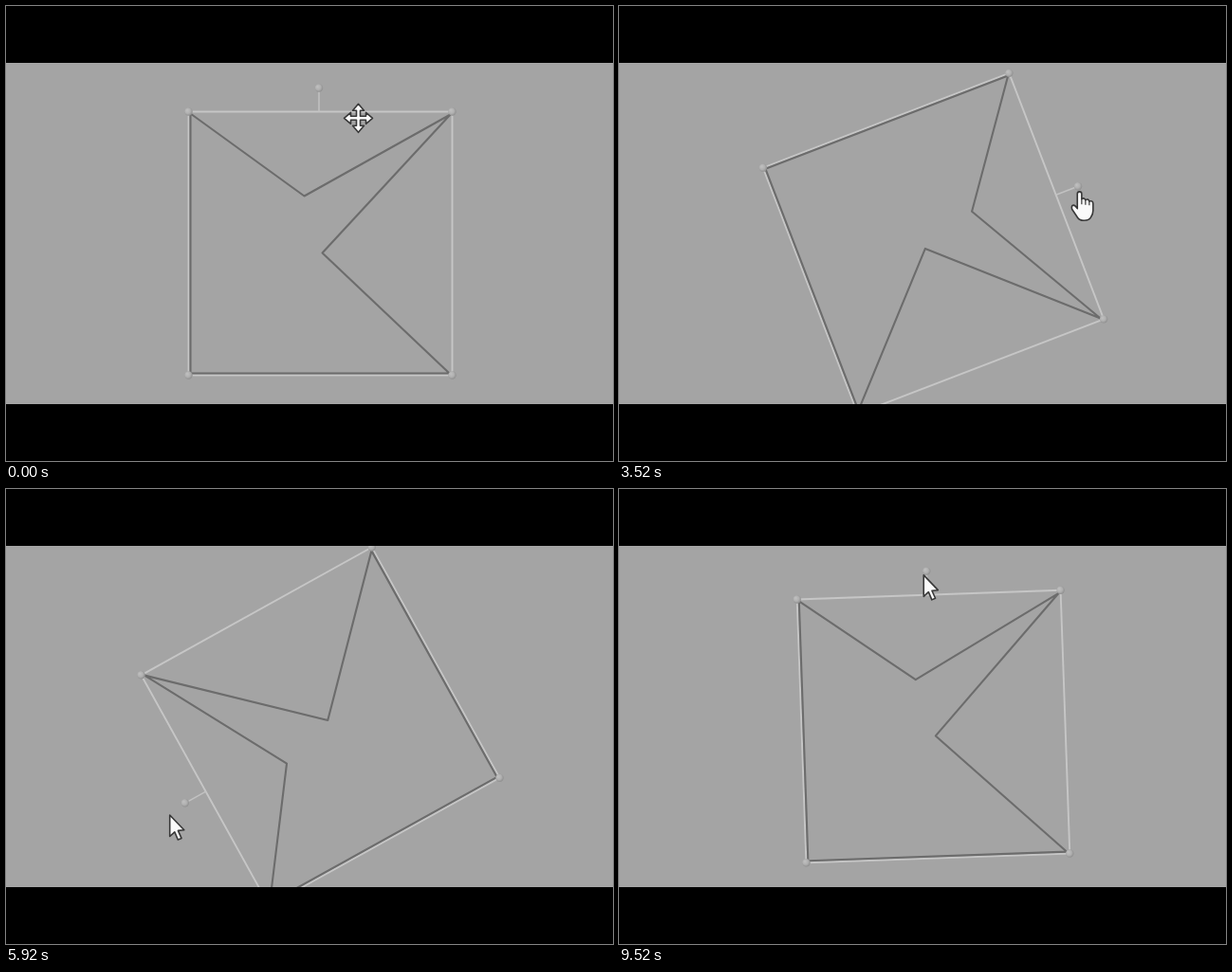
Write an HTML page with a canvas that moves like this. It is 640 by 480 pixels and loops after 9560 ms.

```html
<!DOCTYPE html>
<html lang="en">
<head>
<meta charset="utf-8">
<title>Rotating a shape by its handle</title>
<style>
html, body { margin: 0; width: 100%; height: 100%; overflow: hidden; background: #000; }
canvas { display: block; }
</style>
</head>
<body>
<canvas id="stage" width="640" height="480"></canvas>
<script>
const ctx = document.getElementById('stage').getContext('2d');
const LOOP = 9560, STEP = 40;
const CX = 331.5, CY = 250.5, HALF = 139, KNOB = 164;

// Each leg eases from the previous pose; launch is its starting speed.
const rest = { angle: 0, lead: 0.7, radius: 163 };
const drags = [
  { start: 1500, end: 3200, angle: 72, lead: 1.5, radius: 165, bulge: 15, launch: 0 },
  { start: 3480, end: 5600, angle: -119, lead: -1.4, radius: 184, bulge: -100, launch: 0.82 },
  { start: 7400, end: 8600, angle: -1, lead: -1.9, radius: 163, bulge: 150, launch: 1.25 },
  { start: 9040, end: 9120, angle: -2, lead: -1.9, radius: 161, bulge: 0, launch: 0 }
];

// Pointer travel between the drags
const home = { x: 371.5, y: 118.3 };
const glides = [
  { start: 40, end: 400, x: 324, y: 90 },
  { start: 600, end: 760, x: 333, y: 87 },
  { start: 5560, end: 5600, x: 172, y: 343 },
  { start: 6120, end: 6400, x: 202, y: 373 },
  { start: 6400, end: 6680, x: 192, y: 334 },
  { start: 6840, end: 7000, x: 187, y: 333 }
];

const outline = [[-137, -137], [-17, -50], [137, -136], [2, 10], [136, 137], [-137, 137]];
const corners = [[-HALF, -HALF], [HALF, -HALF], [HALF, HALF], [-HALF, HALF]];

const arrow = new Path2D('M.7 1V23.5L5.8 18.8L9.3 27L13 25.4L9.4 17.4L15.8 16.8Z');
const hand = new Path2D('M-2.3 2.5Q-2.3 .2 0 .2Q2.3 .2 2.3 2.5V8Q5 6 6.3 9Q9 7 10.3 10.3' +
  'Q14.3 9.3 14.3 13V20Q14.2 24 12 27Q10.5 30.5 4.5 30.5Q0 30.5-2 27.5' +
  'L-8 18.5Q-8.7 15-7 14.5Q-4.8 14-2.3 18Z');
const knuckles = new Path2D('M2.3 8V13.5M6.3 9V14M10.3 10.3V14.5');
const cross = new Path2D();
for (let i = 0; i < 4; i++) {
  const turn = new DOMMatrix().rotate(i * 90);
  for (const [x, y] of [[-2, -2], [-2, -8], [-6, -8], [0, -15], [6, -8], [2, -8]]) {
    const p = turn.transformPoint({ x, y });
    cross.lineTo(p.x, p.y);
  }
}
cross.closePath();

const mix = (a, b, p) => a + (b - a) * p;

function ease(u, launch = 0, landing = 0) {
  const v = 1 - u;
  return u * u * (3 - 2 * u) + launch * u * v * v - landing * u * u * v;
}

const progress = (leg, t) => Math.min(1, Math.max(0, (t - leg.start) / (leg.end - leg.start)));

function boxPose(t) {
  let { angle, lead, radius } = rest;
  for (const d of drags) {
    const u = progress(d, t), p = ease(u, d.launch, 0.15);
    angle = mix(angle, d.angle, p);
    lead = mix(lead, d.lead, p);
    radius = mix(radius, d.radius, u) + d.bulge * u * (1 - u);
  }
  return { angle, lead, radius };
}

function rotate([x, y], degrees) {
  const a = degrees * Math.PI / 180, c = Math.cos(a), s = Math.sin(a);
  return [CX + x * c - y * s, CY + x * s + y * c];
}

function pointerAt(t, pose) {
  const dragging = t >= 1520 && t < 5600 || t >= 7400;
  if (dragging) return rotate([0, -pose.radius], pose.angle + pose.lead);
  let { x, y } = home;
  for (const g of glides) {
    const p = ease(progress(g, t));
    x = mix(x, g.x, p);
    y = mix(y, g.y, p);
  }
  return [x, y];
}

function pointerShape(t) {
  if (t < 160) return cross;
  return t >= 640 && t < 5920 || t >= 6880 && t < 9520 ? hand : arrow;
}

function strokeLine(points, color, width, closed) {
  ctx.beginPath();
  for (const p of points) ctx.lineTo(...p);
  if (closed) ctx.closePath();
  ctx.strokeStyle = color;
  ctx.lineWidth = width;
  ctx.stroke();
}

function drawBall([x, y]) {
  const shade = ctx.createRadialGradient(x - 1.5, y - 1.5, 0.5, x - 0.5, y - 0.5, 4.8);
  shade.addColorStop(0, '#bebebe');
  shade.addColorStop(0.55, '#b0b0b0');
  shade.addColorStop(1, '#8e8e8e');
  ctx.fillStyle = shade;
  ctx.beginPath();
  ctx.arc(x, y, 4.2, 0, 7);
  ctx.fill();
}

function drawBox(angle) {
  const turn = p => rotate(p, angle);
  const knob = turn([-1.5, -KNOB]);
  strokeLine(corners.map(turn), '#c6c6c6', 1.9, true);
  strokeLine([turn([-1.5, -HALF]), knob], '#c2c2c2', 1.5);
  strokeLine(outline.map(turn), '#6c6c6c', 2.1, true);
  corners.map(turn).forEach(drawBall);
  drawBall(knob);
}

function drawPointer(t, pose) {
  const shape = pointerShape(t);
  ctx.save();
  ctx.translate(...pointerAt(t, pose));
  ctx.fillStyle = '#fafafa';
  ctx.strokeStyle = '#383838';
  ctx.lineWidth = 1.6;
  ctx.fill(shape);
  ctx.stroke(shape);
  if (shape === hand) {
    ctx.lineWidth = 1.2;
    ctx.stroke(knuckles);
  }
  ctx.restore();
}

function draw(t) {
  const pose = boxPose(t);
  ctx.fillStyle = '#000';
  ctx.fillRect(0, 0, 640, 480);
  ctx.save();
  ctx.beginPath();
  ctx.rect(0, 60, 640, 360);
  ctx.clip();
  ctx.fillStyle = '#a4a4a4';
  ctx.fillRect(0, 60, 640, 360);
  ctx.lineJoin = 'round';
  drawBox(pose.angle);
  drawPointer(t, pose);
  ctx.restore();
}

const start = performance.now();
function tick() {
  const t = (performance.now() - start) % LOOP;
  draw(Math.floor(t / STEP) * STEP);
  requestAnimationFrame(tick);
}
tick();
</script>
</body>
</html>
```
